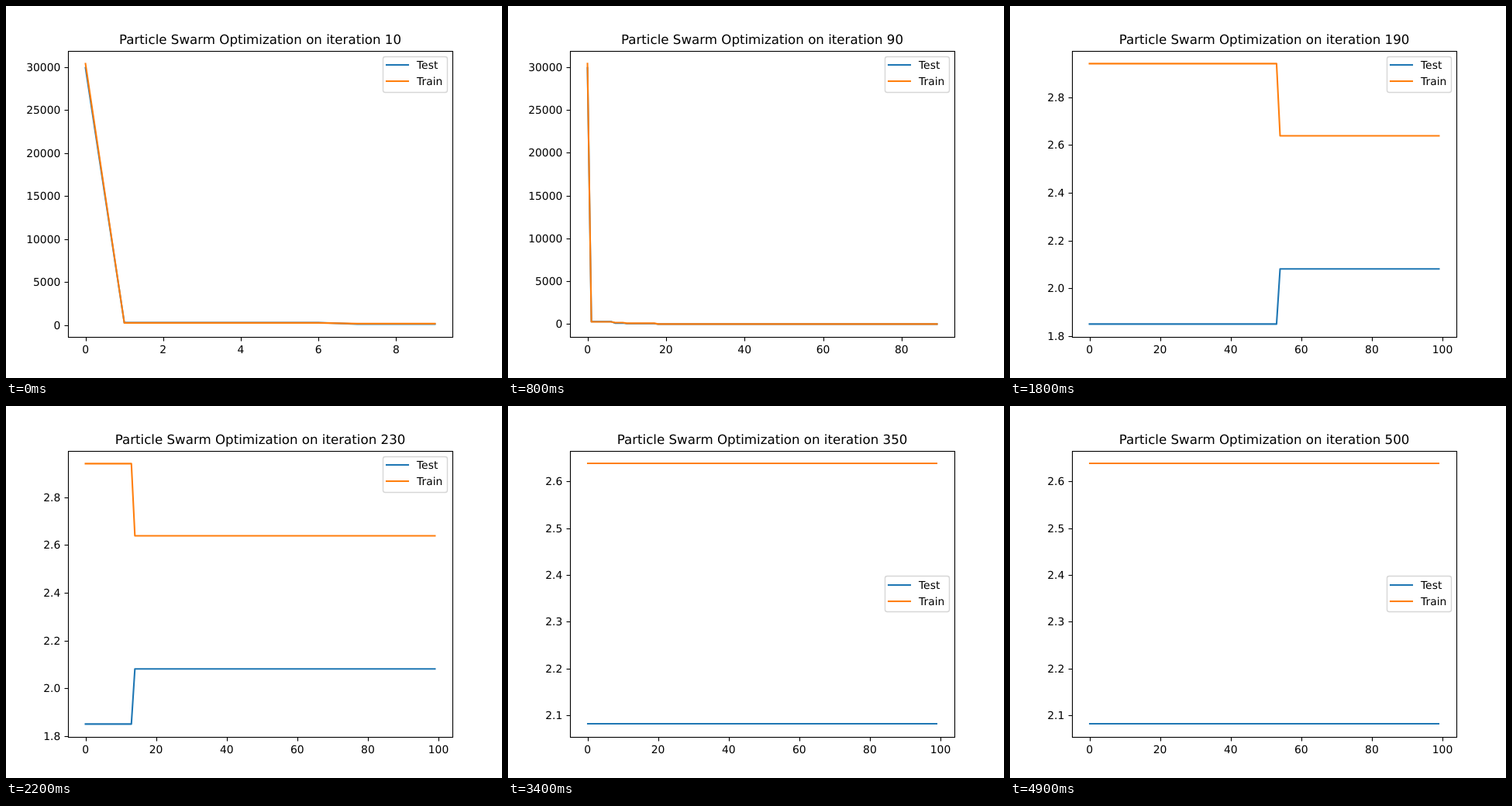
These frames come from a looping animation (640x480 px, 5910 ms). An HTML page:

```html
<!DOCTYPE html>
<html lang="en">
<head>
<meta charset="utf-8">
<title>Particle Swarm Optimization</title>
<style>
  html, body { margin: 0; width: 100%; height: 100%; overflow: hidden; background: #fff; }
  svg { display: block; width: 640px; height: 480px; }
  text { font: 13.889px "DejaVu Sans", sans-serif; text-rendering: geometricPrecision; }
  #title { font-size: 16.667px; text-anchor: middle; }
  #xTicks text { text-anchor: middle; }
  #yTicks text { text-anchor: end; }
  .axis { fill: none; stroke: #000; stroke-width: 1.11; }
  .series { fill: none; stroke-width: 2.083; stroke-linecap: square; stroke-linejoin: round; }
  .test { stroke: #1f77b4; }
  .train { stroke: #ff7f0e; }
  #frame { fill: #fff; fill-opacity: .8; stroke: #ccc; stroke-opacity: .8; stroke-width: 1.39; }
</style>
</head>
<body>
<svg viewBox="0 0 640 480">
  <g id="xTicks"></g>
  <g id="yTicks"></g>
  <polyline id="test" class="series test"/>
  <polyline id="train" class="series train"/>
  <rect class="axis" x="80.5" y="58.5" width="496" height="369"/>
  <text id="title" x="328" y="49"></text>
  <rect id="frame" x="486.5" y="65.5" width="83" height="46" rx="2.8"/>
  <g id="keys">
    <path class="series test" d="M491 76H519"/>
    <text x="530" y="81">Test</text>
    <path class="series train" d="M491 97H519"/>
    <text x="530" y="102">Train</text>
  </g>
</svg>
<script>
const LOOP = 5910, HOLD = 100, LAST = 49, WINDOW = 100;
const X0 = 102.545, X1 = 553.455, Y0 = 410.4, Y1 = 74.4;

// [first iteration, test error, train error]
const levels = [
  [0, 29900, 30380], [1, 285, 260], [7, 120, 170],
  [10, 60, 95], [18, 1.85, 2.94], [144, 2.081, 2.638]
];

const $ = id => document.getElementById(id);
const levelAt = i => levels.findLast(l => l[0] <= i);
const snap = v => Math.floor(v + 0.5);
const scale = (lo, hi, a, b) => v => a + (v - lo) / (hi - lo) * (b - a);

function ticks(lo, hi) {
  const pad = (hi - lo) * 0.05;
  const raw = (hi - lo + 2 * pad) / 9;
  const base = 10 ** Math.floor(Math.log10(raw));
  const step = base * [1, 2, 2.5, 5, 10].find(s => s * base >= raw);
  const list = [];
  for (let n = Math.ceil((lo - pad) / step); n * step <= hi + pad; n++) {
    list.push({ value: n * step, label: (n * step).toFixed(step % 1 ? 1 : 0) });
  }
  return list;
}

function draw(k) {
  const count = 10 * (k + 1);
  const start = Math.max(0, count - WINDOW);
  const size = count - start;
  const rows = Array.from({ length: size }, (_, i) => levelAt(start + i));
  const values = rows.flatMap(r => r.slice(1));
  const lo = Math.min(...values), hi = Math.max(...values);
  const px = scale(0, size - 1, X0, X1);
  const py = scale(lo, hi, Y0, Y1);

  // Flat lines sit on whole pixels
  const flat = rows[0] === rows[size - 1];
  const fit = v => flat ? snap(v) : v.toFixed(2);
  ["test", "train"].forEach((id, s) => {
    $(id).setAttribute("points",
      rows.map((r, i) => fit(px(i)) + "," + fit(py(r[s + 1]))).join(" "));
  });

  $("xTicks").innerHTML = ticks(0, size - 1).map(t => {
    const x = px(t.value);
    return `<path class="axis" d="M${snap(x) + 0.5} 427.5v5"/><text x="${x}" y="448">${t.label}</text>`;
  }).join("");
  $("yTicks").innerHTML = ticks(lo, hi).map(t => {
    const y = snap(py(t.value));
    return `<path class="axis" d="M80.5 ${y + 0.5}h-5"/><text x="70.3" y="${y + 5}">${t.label}</text>`;
  }).join("");

  $("title").textContent = "Particle Swarm Optimization on iteration " + count;

  // The legend moves to the middle while the train line runs under the corner
  const blocked = rows.some((r, i) => px(i) > 485.6 && py(r[2]) < 111);
  $("frame").setAttribute("y", blocked ? 219.5 : 65.5);
  $("keys").setAttribute("transform", `translate(0 ${blocked ? 155 : 0})`);
}

const begin = performance.now();
let shown = -1;
function tick() {
  const t = (performance.now() - begin) % LOOP;
  const k = Math.min(LAST, Math.floor(t / HOLD));
  if (k !== shown) draw(shown = k);
  requestAnimationFrame(tick);
}
tick();
</script>
</body>
</html>
```
